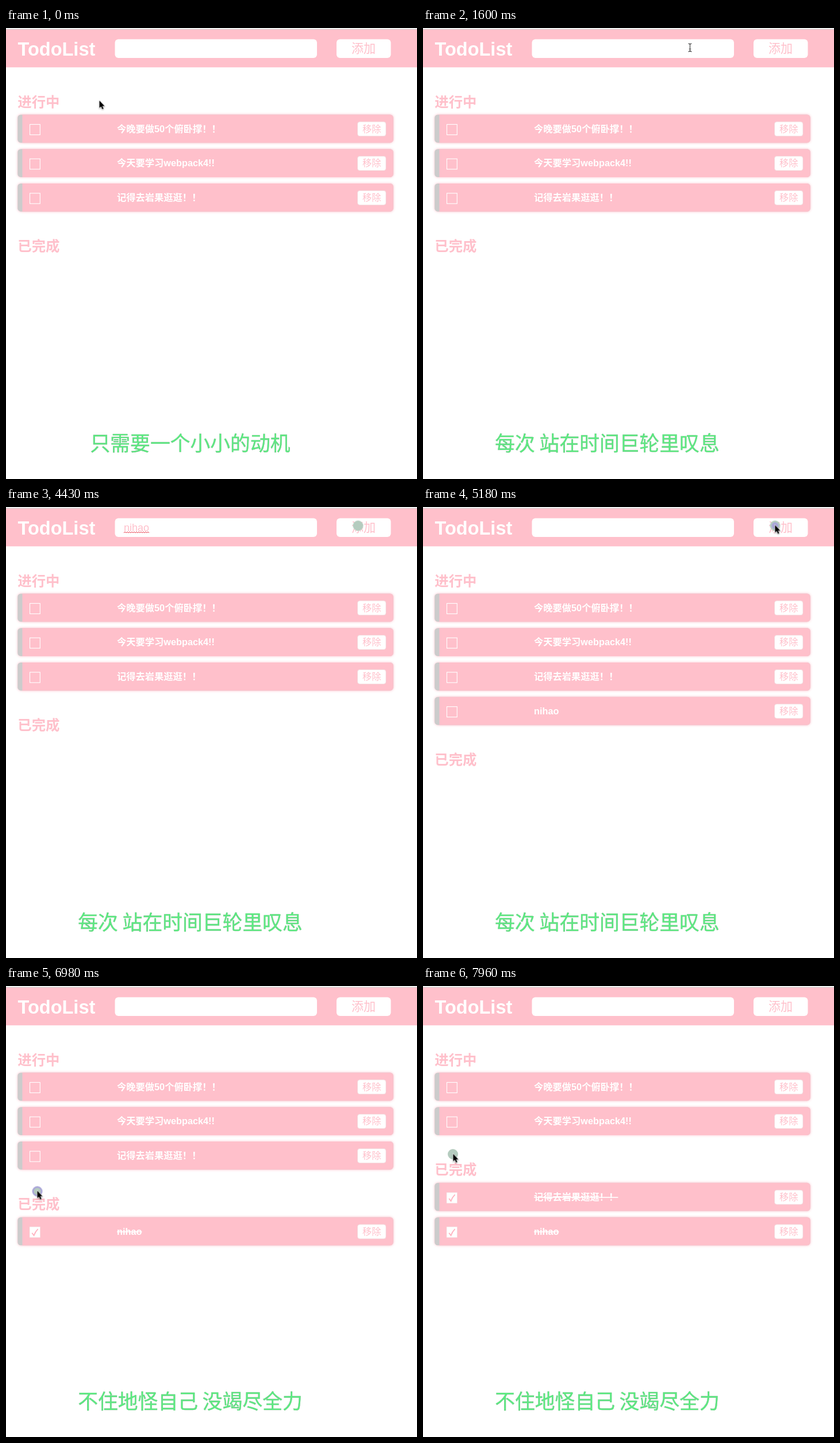
Write an HTML page that moves like this. It is 715 px wide and 783 px high and loops after 8 s.

```html
<!DOCTYPE html>
<html lang="zh-CN">
<head>
<meta charset="utf-8">
<title>TodoList</title>
<style>
html, body { margin: 0; width: 100%; height: 100%; overflow: hidden; background: #fff; }
svg { display: block; width: 715px; height: 783px; overflow: hidden; }
text { font-family: "Liberation Sans", "Noto Sans CJK SC", "Noto Sans CJK", sans-serif; white-space: pre; }

.pink { fill: #ffc0cb; }
.title { font-size: 32.5px; font-weight: bold; fill: #fff; }
.head { font-size: 24.4px; font-weight: bold; fill: #ffc0cb; }
.task { font-size: 16.27px; font-weight: bold; fill: #fff; }
.done { text-decoration: line-through; }
.remove { font-size: 16.27px; }
.add { font-size: 21.1px; }
.field { font-size: 18px; }
.lyric { font: 34.8px "Noto Sans CJK SC", "Noto Sans CJK", sans-serif; text-anchor: middle;
  fill: url(#green); stroke: #6fae80; stroke-width: .4px; }
.bar { filter: drop-shadow(0 0 2px rgba(255, 150, 168, .6)); }

/* One 8 s timeline: 1% = 80 ms */
.cut { animation: 8s step-end infinite; }
.move { animation: 8s linear infinite; }

#line1 { animation-name: line1; }
#line2 { animation-name: line2; }
#line3 { animation-name: line3; }
@keyframes line1 { 5%, 100% { visibility: hidden; } }
@keyframes line2 { 0% { visibility: hidden; } 5% { visibility: visible; } 68.75%, 100% { visibility: hidden; } }
@keyframes line3 { 0% { visibility: hidden; } 68.75%, 100% { visibility: visible; } }

#todo3 { animation-name: todo3; }
#todo4 { animation-name: todo4; }
#done3 { animation-name: done3; }
#done4 { animation-name: done4; }
#doneHead { animation-name: doneHead; }
@keyframes todo3 { 98.1%, 100% { visibility: hidden; } }
@keyframes todo4 { 0% { visibility: hidden; } 64.2% { visibility: visible; } 87.2%, 100% { visibility: hidden; } }
@keyframes done3 { 0% { visibility: hidden; } 98.1%, 100% { visibility: visible; } }
@keyframes done4 { 0% { visibility: hidden; } 87.2%, 100% { visibility: visible; } }
@keyframes doneHead {
  0% { transform: none; }
  64.2% { transform: translateY(59.75px); }
  87.2% { transform: none; }
  98.1%, 100% { transform: translateY(-59.75px); }
}

#edge { animation-name: type; }
#caret { animation-name: caret; }
#wave { animation-name: wave; }
@keyframes type {
  0% { transform: none; }
  36.2% { transform: translateX(10px); }
  37.1% { transform: translateX(14px); }
  38% { transform: translateX(24px); }
  39% { transform: translateX(34px); }
  39.8% { transform: translateX(44px); }
  43.4% { transform: translateX(49px); }
  64.2%, 100% { transform: none; }
}
@keyframes caret {
  0% { visibility: hidden; }
  24.6% { visibility: visible; }
  31% { visibility: hidden; }
  36.2% { visibility: visible; }
  50.6%, 100% { visibility: hidden; }
}
@keyframes wave { 0% { visibility: hidden; } 43.8% { visibility: visible; } 64.2%, 100% { visibility: hidden; } }

#cursor { animation-name: cursor; }
#arrow { animation-name: arrow; }
#beam { animation-name: beam; }
@keyframes cursor {
  0%, .62% { transform: translate(162.5px, 126px); }
  5.5% { transform: translate(400px, 50px); }
  7.8% { transform: translate(478px, 24px); }
  9.8%, 17.5% { transform: translate(475px, 34px); }
  19.9%, 20.1% { transform: translate(464.5px, 34px); }
  21.5%, 24.5% { transform: translate(271px, 35px); }
  28% { transform: translate(300px, 46px); }
  31.3%, 50.6% { transform: translate(329px, 47px); }
  53% { transform: translate(400px, -20px); }
  56.4% { transform: translate(718px, -20px); }
  56.6% { transform: translate(718px, 10px); }
  58.2% { transform: translate(680px, 22px); }
  60.5%, 61% { transform: translate(596px, 33px); }
  61.5%, 65.4% { transform: translate(612.5px, 31.5px); }
  73%, 73.6% { transform: translate(250px, 403px); }
  76.4%, 76.6% { transform: translate(91.5px, 392.5px); }
  78.5% { transform: translate(63px, 332px); }
  80.5%, 82.8% { transform: translate(64px, 362px); }
  84.4%, 89% { transform: translate(54.5px, 355.5px); }
  96%, 100% { transform: translate(52.5px, 291.5px); }
}
@keyframes arrow { 5.5% { visibility: hidden; } 54%, 100% { visibility: visible; } }
@keyframes beam { 0% { visibility: hidden; } 5.5% { visibility: visible; } 54%, 100% { visibility: hidden; } }

/* Click mark: a dot on press, a ring on release */
#click { --tone: #b5ccbf; fill: none; stroke: none; stroke-width: 3px; r: 7.5px; animation-name: click; }
@keyframes click {
  0% { transform: translate(271px, 35px); }
  24.5% { transform: translate(271px, 35px); fill: #b5ccbf; }
  25.5% { transform: translate(271px, 35px); stroke: #b5ccbf; }
  27.2% { transform: translate(612.5px, 32.5px); }
  63.25% { transform: translate(612.5px, 32.5px); fill: #aaa6d8; }
  65.4% { transform: translate(612.5px, 32.5px); stroke: #aaa6d8; }
  66.8% { transform: translate(54.5px, 356.5px); }
  87.2% { transform: translate(54.5px, 356.5px); fill: #b5ccbf; }
  88.2% { transform: translate(54.5px, 356.5px); stroke: #b5ccbf; }
  89.6% { transform: translate(52px, 292px); }
  98.1% { transform: translate(52px, 292px); fill: #b5ccbf; }
  99.2%, 100% { transform: translate(52px, 292px); stroke: #b5ccbf; }
}
</style>
</head>
<body>
<svg viewBox="0 0 715 783">
  <defs>
    <linearGradient id="green" x1="0" y1="0" x2="0" y2="1">
      <stop offset="0" stop-color="#4ff578"/>
      <stop offset=".5" stop-color="#5cec82"/>
      <stop offset="1" stop-color="#55f07c"/>
    </linearGradient>
    <pattern id="zigzag" width="4" height="4" x="205" y="42" patternUnits="userSpaceOnUse">
      <path d="M-1 3.5L0 3L2 1L4 3L5 3.5" fill="none" stroke="#e8404f"/>
    </pattern>
    <g id="row">
      <g class="bar">
        <rect x="20.2" width="653.5" height="48.8" rx="5.5" fill="#ccc"/>
        <path class="pink" d="M28.5 0H668.2a5.5 5.5 0 0 1 5.5 5.5V43.3a5.5 5.5 0 0 1-5.5 5.5H28.5Z"/>
      </g>
      <rect x="611.5" y="12.4" width="49.5" height="25" rx="4" fill="#fff" stroke="#f2d3d8" stroke-width=".8"/>
      <text class="pink remove" x="620" y="30.3">移除</text>
    </g>
    <g id="open">
      <use href="#row"/>
      <rect x="41.5" y="17" width="17.8" height="18" fill="none" stroke="#fff" stroke-width="1.1"/>
    </g>
    <g id="ticked">
      <use href="#row"/>
      <rect x="41" y="16.5" width="18.6" height="18.8" fill="#fff" stroke="#f2d3d8" stroke-width=".6"/>
      <path d="M45.2 27.2L48.6 31.6Q51 25 55.6 20.4" fill="none" stroke="#ffb3c0" stroke-width="1.8"/>
    </g>
  </defs>

  <rect class="pink" y="2" width="715" height="66.3"/>
  <rect y="1.4" width="715" height="1.3" fill="#d3d0d1"/>
  <text class="title" x="20.5" y="47.5">TodoList</text>
  <rect x="189.5" y="19.5" width="351.5" height="32.5" rx="6" fill="#fff"/>
  <rect x="575" y="19.5" width="94.5" height="32.5" rx="6" fill="#fff"/>
  <text class="pink add" x="601" y="43.3">添加</text>

  <text class="pink field" x="205" y="42">nihao</text>
  <g id="edge" class="cut">
    <rect x="205" y="24" width="60" height="24" fill="#fff"/>
    <rect id="caret" class="cut pink" x="205" y="25.5" width="1" height="20"/>
  </g>
  <rect id="wave" class="cut" x="205" y="42" width="44" height="4" fill="url(#zigzag)"/>

  <text class="head" x="20.3" y="137">进行中</text>
  <g transform="translate(0 150.4)">
    <use href="#open"/><text class="task" x="193" y="30.2">今晚要做50个俯卧撑！！</text>
  </g>
  <g transform="translate(0 210.15)">
    <use href="#open"/><text class="task" x="193" y="30.2">今天要学习webpack4!!</text>
  </g>
  <g id="todo3" class="cut" transform="translate(0 269.9)">
    <use href="#open"/><text class="task" x="193" y="30.2">记得去岩果逛逛！！</text>
  </g>
  <g id="todo4" class="cut" transform="translate(0 329.65)">
    <use href="#open"/><text class="task" x="193" y="30.2">nihao</text>
  </g>

  <text id="doneHead" class="head cut" x="20.3" y="387.2">已完成</text>
  <g id="done3" class="cut" transform="translate(0 341.8)">
    <use href="#ticked"/><text class="task done" x="193" y="30.2">记得去岩果逛逛！！</text>
  </g>
  <g id="done4" class="cut" transform="translate(0 401.5)">
    <use href="#ticked"/><text class="task done" x="193" y="30.2">nihao</text>
  </g>

  <text id="line1" class="lyric cut" x="320.5" y="733.5">只需要一个小小的动机</text>
  <text id="line2" class="lyric cut" x="320.5" y="733.5">每次 站在时间巨轮里叹息</text>
  <text id="line3" class="lyric cut" x="320.5" y="733.5">不住地怪自己 没竭尽全力</text>

  <circle id="click" class="cut" r="7.5"/>
  <g id="cursor" class="move">
    <g id="arrow" class="cut">
      <path d="M0 0V12.8L2.9 10.2L5 15L7.2 14L5.1 9.4H9Z" stroke="#fff" stroke-width="1.2"
        paint-order="stroke" style="filter: drop-shadow(0 1px 1px rgba(0,0,0,.35))"/>
    </g>
    <path id="beam" class="cut" d="M-3 -7Q0 -7 0 -5Q0 -7 3 -7M0 -5V5M-3 7Q0 7 0 5Q0 7 3 7M-1.5 2.5H1.5"
      fill="none" stroke="#333" stroke-width="1.2"/>
  </g>
</svg>
</body>
</html>
```
